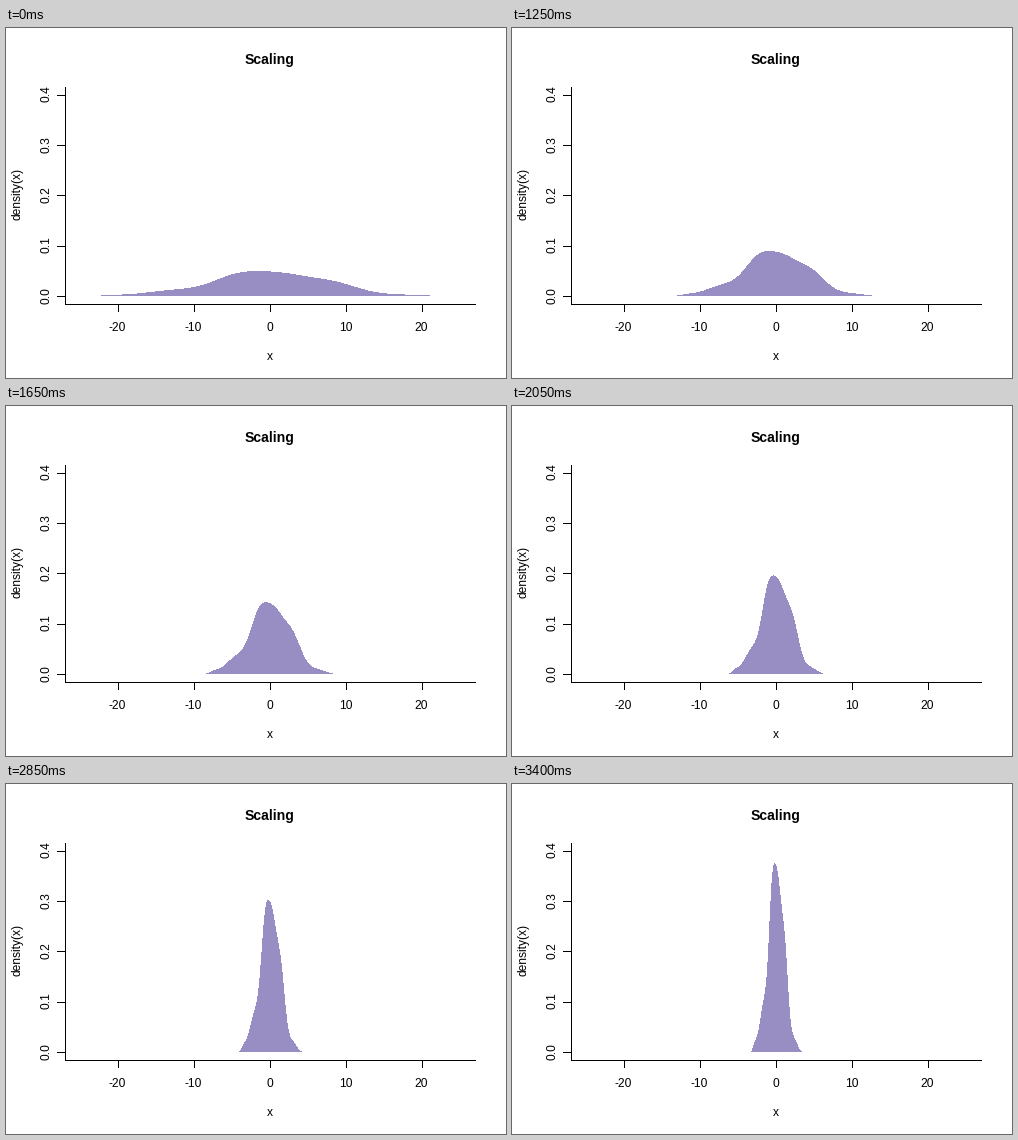
A matplotlib script for the animation above (4.4 s loop, 500x350 px).

```python
import numpy as np
import matplotlib
import matplotlib.pyplot as plt
from matplotlib.animation import FuncAnimation
from matplotlib.patches import Rectangle

WIDTH, HEIGHT, DPI = 500, 350, 100
INTERVAL, FRAMES = 50, 88
HOLD_FRAMES, STEPS, GAIN = 19, 49, 0.1315
ORIGIN_X, ORIGIN_Y = 264.4, 268.5
UNIT_X, UNIT_Y = 7.606, 503.5
LEFT, RIGHT, TOP, BOTTOM = 59, 470, 59, 276
FLOOR = int(ORIGIN_Y)
PEAK = 25.45

matplotlib.rcParams["font.family"] = "Liberation Sans"


def bell(x, centre, height, spread):
    return height * np.exp(-((x - centre) / spread) ** 2 / 2)


def density(x):
    """Unscaled density height in pixels, a sum of bells around the core."""
    core = bell(x, -34, 17, 24.5) + bell(x, 10, 18.8, 27)
    shoulders = bell(x, -92, 6.4, 33) + bell(x, 62, 13, 27)
    tails = bell(x, -160, 0.75, 14) + bell(x, 134, 1.65, 25)
    return core + shoulders + tails


fig = plt.figure(figsize=(WIDTH / DPI, HEIGHT / DPI), dpi=DPI, facecolor="white")
ax = fig.add_axes([0, 0, 1, 1])
ax.set_xlim(0, WIDTH)
ax.set_ylim(HEIGHT, 0)
ax.axis("off")


def bar(x, y, width, height):
    ax.add_patch(Rectangle((x, y), width, height, fc="black", lw=0,
                           antialiased=False))


def label(x, y, text, px=12, **style):
    ax.text(x, y, text, fontsize=px * 72 / DPI, ha="center", va="baseline",
            rotation_mode="anchor", **style)


bar(LEFT, TOP, 1, BOTTOM + 1 - TOP)
bar(LEFT, BOTTOM, RIGHT - LEFT, 1)

for value in range(-20, 21, 10):
    x = ORIGIN_X + value * UNIT_X
    bar(int(x), BOTTOM, 1, 8)
    label(x - 1, 303, str(value))

for tenth in range(5):
    y = ORIGIN_Y - tenth / 10 * UNIT_Y
    bar(LEFT - 8, int(y), 8, 1)
    label(43, y - 1.2, f"{tenth / 10:.1f}", rotation=90)

label(ORIGIN_X - 0.7, 36, "Scaling", px=14, weight="bold")
label(ORIGIN_X - 1, 332, "x")
label(14, 166, "density(x)", rotation=90)

# One whole-pixel column per step keeps the silhouette hard-edged.
edges = np.arange(LEFT, RIGHT + 1)
offsets = edges[:-1] + 0.5 - ORIGIN_X
gain = PEAK / density(offsets).max()
shape = ax.stairs(np.full(len(offsets), FLOOR), edges, baseline=FLOOR, fill=True,
                  color="#998ec3", lw=0, antialiased=False, snap=False)


def update(frame):
    step = min(max(frame - HOLD_FRAMES, 0), STEPS)
    scale = 1 + GAIN * step
    heights = gain * scale * density(offsets * scale)
    shape.set_data(values=FLOOR - np.floor(heights))
    return (shape,)


anim = FuncAnimation(fig, update, frames=FRAMES, interval=INTERVAL, repeat=True)
plt.show()
```
